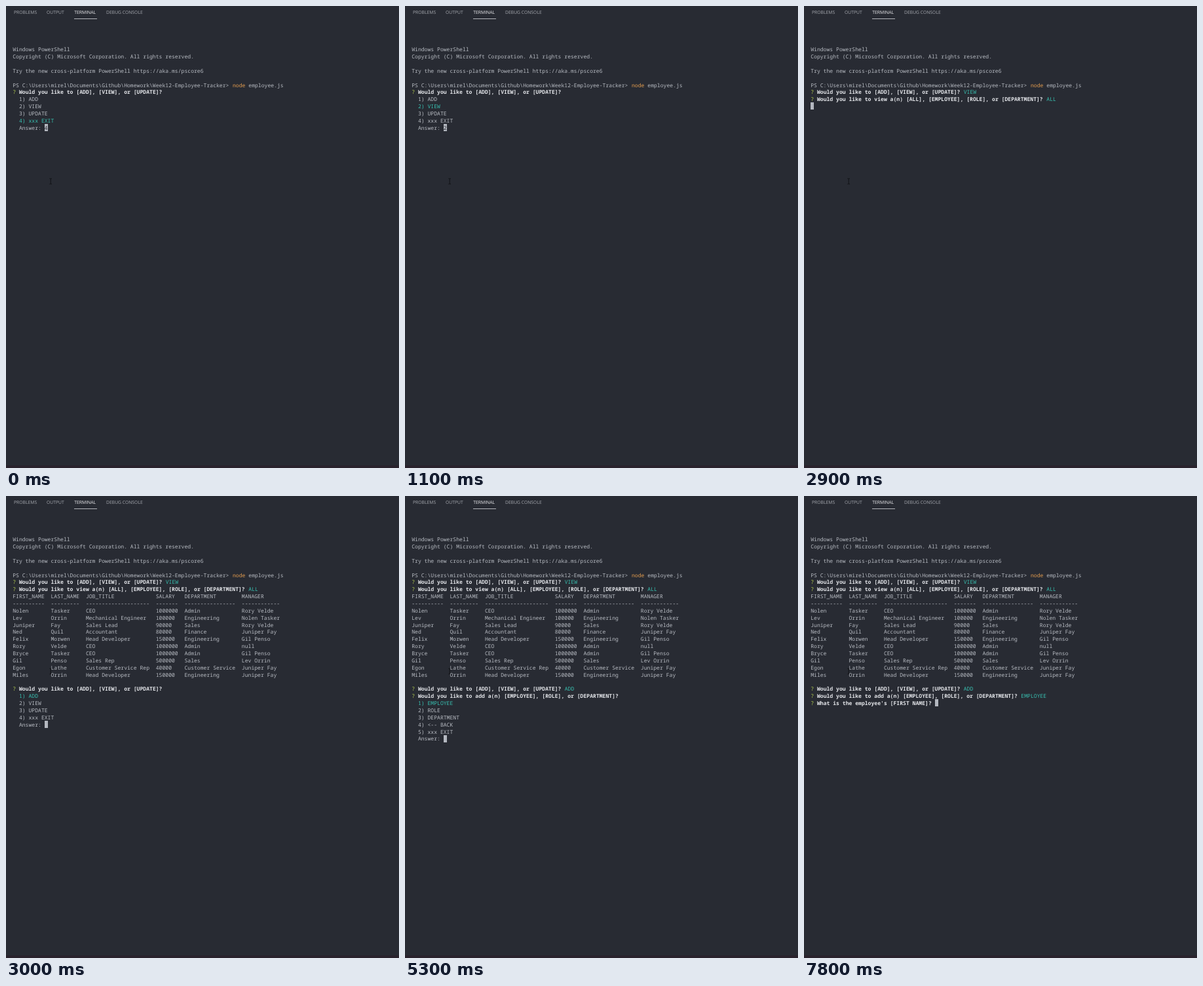
Write an HTML page that moves like this. It is 600 px wide and 705 px high and loops after 8000 ms.

```html
<!DOCTYPE html>
<html lang="en">
<head>
<meta charset="utf-8">
<title>Employee tracker terminal</title>
<style>
  html, body { margin: 0; width: 100%; height: 100%; overflow: hidden; background: #282b33; }
  svg { display: block; width: 600px; height: 705px; }
  text { white-space: pre; text-rendering: geometricPrecision; }
  #screen { font: 8.11px "Noto Sans Mono", "DejaVu Sans Mono", monospace; fill: #b7bbc2; }
  #tabs { font: 6.8px "Open Sans", "Noto Sans", sans-serif; fill: #a7aab0; }
  #tabs .on { fill: #f0f0f2; }
  .bold { font-weight: 700; fill: #e4e6ea; }
  .pick { fill: #38bfb0; }
  .cmd { fill: #e39c4e; }
  .mark { fill: #b2cc50; }
  .block { fill: #b4b8c0; }
  .dark { fill: #282b33; }
</style>
</head>
<body>
<svg viewBox="0 0 600 705" xmlns="http://www.w3.org/2000/svg">
  <rect width="600" height="705" fill="#282b33"/>
  <rect y="701" width="600" height="4" fill="#2a232d"/>
  <g id="tabs">
    <text x="12" y="12.4">PROBLEMS</text>
    <text x="62" y="12.4">OUTPUT</text>
    <text x="104.3" y="12.4" class="on">TERMINAL</text>
    <text x="153" y="12.4">DEBUG CONSOLE</text>
    <rect x="104" y="19" width="35" height="1" fill="#b3b5ba"/>
  </g>
  <path d="M66.4 263.3H67.6L68.2 263.8L68.8 263.3H70M68.2 263.8V271.2M66.4 271.7H67.6L68.2 271.2L68.8 271.7H70"
        fill="none" stroke="#0c0d10" stroke-width="0.8"/>
  <g id="screen"></g>
</svg>
<script>
const LOOP = 8000;
const LEFT = 10.2, BASE = 69.3, CELL = 8.11 * 0.6, ROW = 10.86;
const screen = document.getElementById("screen");

const ASK = "Would you like to [ADD], [VIEW], or [UPDATE]?";
const ASK_VIEW = "Would you like to view a(n) [ALL], [EMPLOYEE], [ROLE], or [DEPARTMENT]?";
const ASK_ADD = "Would you like to add a(n) [EMPLOYEE], [ROLE], or [DEPARTMENT]?";
const MAIN = ["ADD", "VIEW", "UPDATE", "xxx EXIT"];
const VIEW = ["ALL", "EMPLOYEE", "ROLE", "DEPARTMENT", "<-- BACK", "xxx EXIT"];
const ADD = ["EMPLOYEE", "ROLE", "DEPARTMENT", "<-- BACK", "xxx EXIT"];

const WIDTHS = [10, 9, 20, 7, 16, 12];
const STAFF = `FIRST_NAME|LAST_NAME|JOB_TITLE|SALARY|DEPARTMENT|MANAGER
${WIDTHS.map(w => "-".repeat(w)).join("|")}
Nolen|Tasker|CEO|1000000|Admin|Rory Velde
Lev|Orrin|Mechanical Engineer|100000|Engineering|Nolen Tasker
Juniper|Fay|Sales Lead|90000|Sales|Rory Velde
Ned|Quil|Accountant|80000|Finance|Juniper Fay
Felix|Morwen|Head Developer|150000|Engineering|Gil Penso
Rory|Velde|CEO|1000000|Admin|null
Bryce|Tasker|CEO|1000000|Admin|Gil Penso
Gil|Penso|Sales Rep|500000|Sales|Lev Orrin
Egon|Lathe|Customer Service Rep|40000|Customer Service|Juniper Fay
Miles|Orrin|Head Developer|150000|Engineering|Juniper Fay`;

// A line is a list of [text, class] pieces.
const plain = text => [[text, ""]];
const question = (text, answer = "") => [["? ", "mark"], [text + " ", "bold"], [answer, "pick"]];
const cursor = (char = " ") => [char, "cursor"];
const menu = (items, chosen, typed) => [
  ...items.map((item, i) => [[`  ${i + 1}) ${item}`, i + 1 === chosen ? "pick" : ""]]),
  [["  Answer: ", ""], cursor(typed)]
];

const intro = [
  plain("Windows PowerShell"),
  plain("Copyright (C) Microsoft Corporation. All rights reserved."),
  [],
  plain("Try the new cross-platform PowerShell https://aka.ms/pscore6"),
  [],
  [["PS C:\\Users\\mirel\\Documents\\Github\\Homework\\Week12-Employee-Tracker> ", ""],
   ["node ", "cmd"], ["employee.js", ""]]
];
const table = STAFF.split("\n").map(line =>
  plain(line.split("|").map((cell, i) => cell.padEnd(WIDTHS[i] + 2)).join("")));

const mainMenu = n => [...intro, question(ASK), ...menu(MAIN, n, String(n))];
const viewed = [...intro, question(ASK, "VIEW")];
const listed = [...viewed, question(ASK_VIEW, "ALL")];
const report = [...listed, ...table, []];
const adding = [...report, question(ASK, "ADD")];

const steps = [
  [0, mainMenu(4)],
  [500, mainMenu(3)],
  [800, mainMenu(2)],
  [2000, [...viewed, question(ASK_VIEW), ...menu(VIEW, 1)]],
  [2900, [...listed, [cursor()]]],
  [3000, [...report, question(ASK), ...menu(MAIN, 1)]],
  [5300, [...adding, question(ASK_ADD), ...menu(ADD, 1)]],
  [6900, [...adding, question(ASK_ADD, "EMPLOYEE"),
          [...question("What is the employee's [FIRST NAME]?"), cursor()]]]
];

function add(tag, attrs, text = "") {
  const node = document.createElementNS("http://www.w3.org/2000/svg", tag);
  for (const key in attrs) node.setAttribute(key, attrs[key]);
  node.textContent = text;
  screen.append(node);
}

function draw(lines) {
  screen.replaceChildren();
  lines.forEach((line, row) => {
    const y = BASE + row * ROW;
    let col = 0;
    for (const [text, kind] of line) {
      const x = LEFT + col * CELL;
      const onBlock = kind === "cursor";
      if (onBlock) {
        add("rect", { x: Math.round(x), y: Math.round(y - 8.8), width: 5, height: 11, class: "block" });
      }
      if (text.trim()) add("text", { x, y, class: onBlock ? "dark" : kind }, text);
      col += text.length;
    }
  });
}

let shown;
function update(now) {
  const t = now % LOOP;
  const lines = steps.findLast(step => step[0] <= t)[1];
  if (lines !== shown) draw(shown = lines);
}

const start = performance.now();
function tick() {
  update(performance.now() - start);
  requestAnimationFrame(tick);
}
tick();
</script>
</body>
</html>
```
